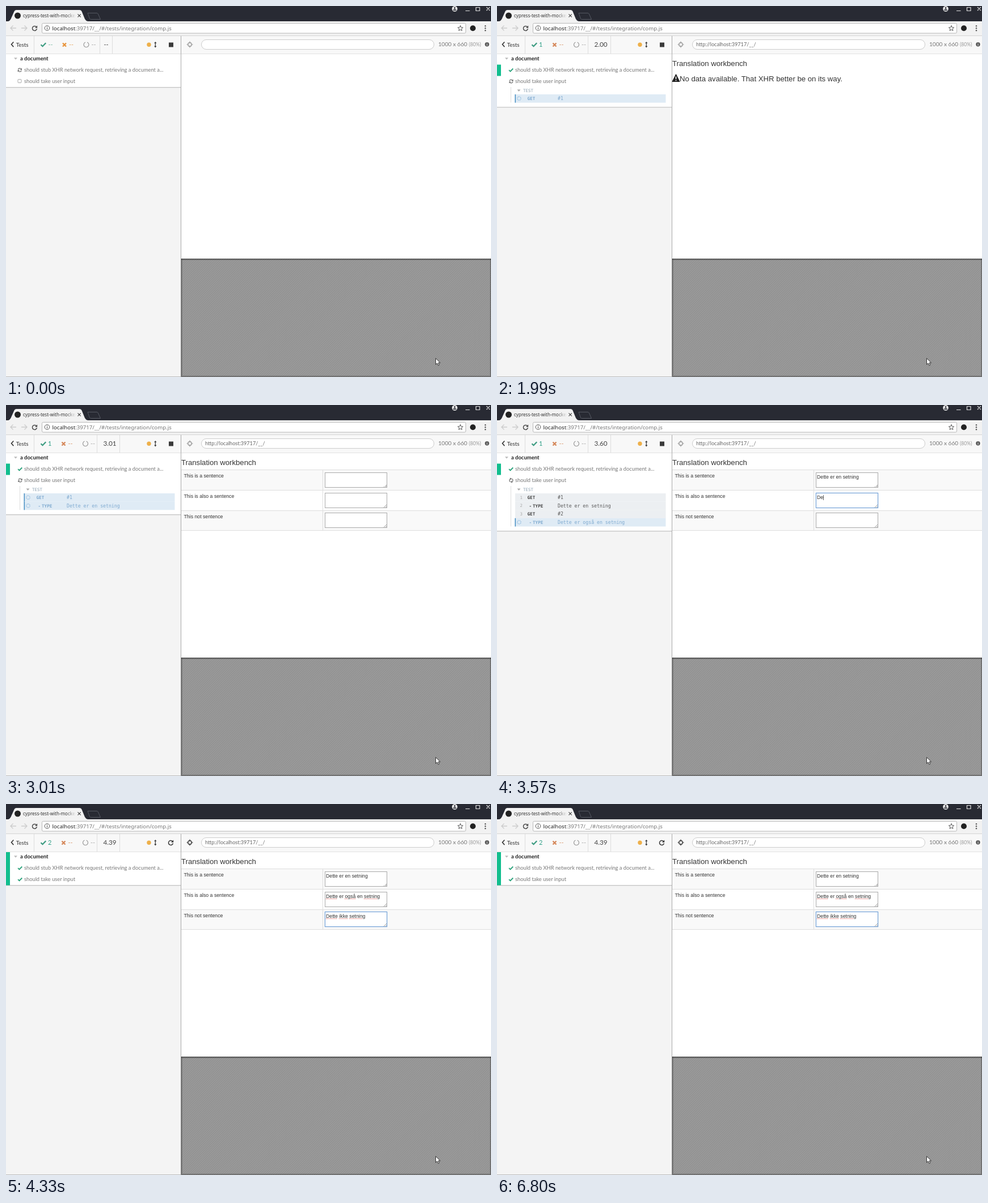
An HTML page that plays this animation: 855x655 px, repeating every 7.51 s.

```html
<!DOCTYPE html>
<html lang="en">
<head>
<meta charset="utf-8">
<title>Test runner</title>
<style>
html, body { margin: 0; width: 100%; height: 100%; overflow: hidden; background: #f4f4f4; }
#stage { position: absolute; left: 0; top: 0; width: 855px; height: 655px; overflow: hidden; }
svg { position: absolute; left: 0; top: 0; display: block; }
text { white-space: pre; }
.ui { font-family: Lato, sans-serif; }
.chrome { font-family: "Noto Sans", "Open Sans", sans-serif; }
.app { font-family: "Liberation Sans", Arial, sans-serif; fill: #333; }
.mono { font-family: "DejaVu Sans Mono", monospace; }
.line { fill: none; stroke-linecap: butt; }
.title { font-size: 9.3px; fill: #777; }
.cmd .bg { fill: #eceff2; }
.cmd .edge, .cmd .busy { display: none; }
.cmd .name { font-weight: bold; font-size: 7.6px; fill: #444; }
.cmd .arg { font-size: 8.2px; fill: #5a5a5a; }
.cmd .num { font-size: 7.4px; fill: #aaa; }
.wait .bg { fill: #dfebf5; }
.wait .edge, .wait .busy { display: inline; }
.wait .num { display: none; }
.wait .name, .wait .arg { fill: #7faad0; }
.field {
  position: absolute; left: 562px; width: 106px; height: 22px; padding: 2px 1px 1px;
  border: 1px solid #a9a9a9; background: #fff; color: #333; white-space: pre;
  font: 8.74px/10px "Liberation Sans", Arial, sans-serif;
}
.field::after {
  content: ""; position: absolute; right: 0; bottom: 0; width: 5px; height: 5px;
  background: linear-gradient(135deg, transparent 50%, #999 50% 60%, transparent 60% 76%, #999 76% 88%, transparent 88%);
}
.field.focus { border-color: #6f9fd6; box-shadow: 0 0 1px #6f9fd6; }
.field.caret span::after { content: ""; display: inline-block; width: 1px; height: 9px; margin-right: -1px; background: #666; vertical-align: -2px; }
.field u { text-decoration: underline dotted #e0524d 1px; text-underline-offset: 1px; }
</style>
</head>
<body>
<div id="stage">
<svg width="855" height="655" viewBox="0 0 855 655">
  <defs>
    <pattern id="stripes" width="2.83" height="2.83" patternUnits="userSpaceOnUse" patternTransform="rotate(45)">
      <rect width="2.83" height="2.83" fill="#9d9d9d"/><rect width="1.4" height="2.83" fill="#8f8f8f"/>
    </pattern>
    <linearGradient id="shade" x2="0" y2="1"><stop stop-color="#000" stop-opacity=".55"/><stop offset="1" stop-color="#000" stop-opacity="0"/></linearGradient>
    <linearGradient id="fade" gradientUnits="userSpaceOnUse" x1="106" x2="123" y1="0" y2="0"><stop stop-color="#333"/><stop offset="1" stop-color="#333" stop-opacity="0"/></linearGradient>
    <path id="tick" class="line" d="M-3.6 .1L-1.2 2.4L3.6 -2.5" stroke="#2ba37b" stroke-width="1.8"/>
    <g id="half"><path class="line" d="M-3 -.5A3 3 0 0 1 2.1 -2.1" stroke="#666" stroke-width="1.2"/><path d="M3.5 -3.7V-.4H.3Z" fill="#666"/></g>
    <g id="sync"><use href="#half"/><use href="#half" transform="rotate(180)"/></g>
    <g id="reload"><path class="line" d="M3 -2.4A4 4 0 1 0 3.9 1" stroke="currentColor" stroke-width="1.5"/><path d="M4.7 -4.7V-.5H.5Z" fill="currentColor"/></g>
    <path id="cross" class="line" d="M-3 -3L3 3M3 -3L-3 3" stroke-width="2.4"/>
    <path id="notch" class="line" d="M1.5 -4.3A4.5 4.5 0 1 1 -1.5 -4.3" stroke="#999" stroke-width="1.2"/>
    <path id="down" d="M-3 -1.8H3L0 1.8Z"/>
    <circle id="ring" class="line" r="3.2" stroke="#79acd6" stroke-width="1.1" stroke-dasharray="1.3 1.2" pathLength="20"/>
  </defs>

  <!-- browser frame -->
  <rect width="855" height="27" fill="#282a33"/>
  <path d="M4 27Q7 26 8.500 23L14.500 9.500Q15.500 7 18 7H130Q132.500 7 133.500 9.500L139 23Q140.500 26 144 27Z" fill="#f2f2f2"/>
  <path class="line" d="M144 12.500H160Q161.500 12.500 162.300 14L166.500 23.500H149.500Q148 23.500 147.300 22Z" stroke="#555862"/>
  <circle cx="20.500" cy="17" r="5.500" fill="#222"/>
  <text class="chrome" x="30" y="20" font-size="8.05" fill="url(#fade)">cypress-test-with-mocked</text>
  <path class="line" d="M126.500 14.300L131.800 19.600M131.800 14.300L126.500 19.600" stroke="#444" stroke-width="1.2"/>
  <circle cx="791" cy="5" r="4.800" fill="#eee"/>
  <circle cx="791" cy="3.500" r="1.500" fill="#282a33"/><path d="M788 8Q788 5.700 791 5.700T794 8Z" fill="#282a33"/>
  <path class="line" d="M810 8.500H817.500M828.500 2.500H835V8.500H828.500ZM847 2L853 8M853 2L847 8" stroke="#e0e0e0" stroke-width="1.2"/>
  <rect y="27" width="855" height="25.500" fill="#f2f2f2"/>
  <path class="line" d="M18 39H8M12.500 34.500L8 39L12.500 43.500M27 39H37M32.500 34.500L37 39L32.500 43.500" stroke="#ccc" stroke-width="1.3"/>
  <use href="#reload" x="50.500" y="39.200" color="#4a4a4a"/>
  <rect x="63.500" y="30.500" width="747" height="17.500" rx="2" fill="#fff" stroke="#b8b8b8"/>
  <circle class="line" cx="72.500" cy="39" r="4.300" stroke="#555"/>
  <path class="line" d="M72.500 38.300V41.500M72.500 36.300V37.500" stroke="#555" stroke-width="1.1"/>
  <text class="chrome" x="81.500" y="42.700" font-size="9.65" fill="#777"><tspan fill="#222">localhost</tspan>:39717/__/#/tests/integration/comp.js</text>
  <path class="line" d="M801 34.500L802.300 37.800L805.600 38L803 40.200L803.900 43.500L801 41.700L798.100 43.500L799 40.200L796.400 38L799.700 37.800Z" stroke="#555"/>
  <circle cx="823" cy="39.300" r="5" fill="#222"/>
  <g fill="#555"><circle cx="845" cy="35.200" r="1.200"/><circle cx="845" cy="39.200" r="1.200"/><circle cx="845" cy="43.200" r="1.200"/></g>

  <!-- runner header -->
  <rect y="52" width="855" height="33" fill="#f8f8f8"/>
  <path class="line" d="M0 52.500H855" stroke="#d4d4d4"/>
  <path class="line" d="M13.300 63.500L9.500 67.800L13.300 72.100" stroke="#333" stroke-width="1.6"/>
  <text class="ui" x="17.700" y="71.500" font-size="9.9" fill="#333">Tests</text>
  <path class="line" d="M49.500 53V84" stroke="#ddd"/>
  <path class="line" d="M61.500 68.200L64.500 71.200L70.200 65.200" stroke="#3d9c81" stroke-width="2.3"/>
  <g class="ui" font-size="11">
    <g data-on="0 750">
      <text x="74.500" y="72" fill="#79b8a3">--</text>
      <use href="#cross" x="103" y="68.500" stroke="#e8943c"/><text x="111" y="72" fill="#e8a55f">--</text>
      <use href="#notch" x="141.500" y="68.300"/><text x="150.500" y="72" fill="#aaa">--</text>
      <path class="line" d="M165.500 53V84" stroke="#ddd"/>
    </g>
    <g data-on="750 7510">
      <text id="passed" x="74" y="72" fill="#2f9f87">1</text>
      <use href="#cross" x="101.500" y="68.500" stroke="#d6895c"/><text x="109.500" y="72" fill="#d9986f">--</text>
      <use href="#notch" x="140" y="68.300"/><text x="149" y="72" fill="#aaa">--</text>
      <path class="line" d="M160.500 53V84" stroke="#ddd"/>
    </g>
    <text id="clock" y="72" fill="#444">--</text>
    <path id="clockEdge" class="line" d="M0 53V84" stroke="#ddd"/>
  </g>
  <circle cx="252" cy="68.300" r="3.700" fill="#eeb04a"/>
  <path d="M263.300 63L265.500 65.800H263.900V70.700H265.500L263.300 73.500L261.100 70.700H262.700V65.800H261.100Z" fill="#333"/>
  <rect data-on="0 4330" x="287" y="64.500" width="8" height="8" fill="#3a3a3a"/>
  <use data-on="4330 7510" href="#reload" x="290.500" y="68.300" color="#333"/>
  <g id="aim" class="line" stroke="#999" stroke-width="1.200" transform="translate(324 68)"><circle r="3.300"/><path d="M0 -5.500V-1.800M0 5.500V1.800M-5.500 0H-1.800M5.500 0H1.800"/></g>
  <rect x="344.500" y="59.500" width="410" height="17" rx="8.500" fill="#fff" stroke="#ccc"/>
  <text class="ui" data-on="300 7510" x="351" y="71" font-size="9.1" fill="#666">http://localhost:39717/__/</text>
  <text class="ui" x="762" y="71.300" font-size="10.1" fill="#777">1000 x 660</text>
  <text class="ui" x="816" y="71.300" font-size="8.6" fill="#999">(80%)</text>
  <circle cx="848" cy="67.800" r="3.700" fill="#555"/><path class="line" d="M848 67.200V70M848 65.200V66.300" stroke="#f8f8f8" stroke-width="1.100"/>

  <!-- test list -->
  <rect y="84" width="308" height="571" fill="#f4f4f4"/>
  <g id="edge"><path class="line" d="M0 .5H308" stroke="#c6c6c6"/><path class="line" d="M0 1.500H308" stroke="#e4e4e4"/></g>
  <rect id="panel" y="84" width="308" fill="#fff"/>
  <rect data-on="750 4330" y="103.500" width="7" height="20" fill="#12be8e"/>
  <rect data-on="4330 7510" y="84" width="7" height="59.500" fill="#12be8e"/>
  <use href="#down" x="17" y="93" fill="#bbb"/>
  <text class="ui" x="25" y="96" font-size="9.450" font-weight="bold" fill="#222">a document</text>
  <use class="spin" data-on="0 750" data-pos="24.300 113" href="#sync"/>
  <use data-on="750 7510" href="#tick" x="24.700" y="113"/>
  <text class="ui title" x="32" y="116">should stub XHR network request, retrieving a document a...</text>
  <rect class="line" data-on="0 750" x="21" y="129.500" width="6" height="6" rx="1" stroke="#aaa"/>
  <use class="spin" data-on="750 4330" data-pos="25 133" href="#sync"/>
  <use data-on="4330 7510" href="#tick" x="24.700" y="133"/>
  <text class="ui title" x="32" y="136">should take user input</text>
  <g data-on="1050 4330">
    <path id="rail" class="line" stroke="#ddd"/>
    <use href="#down" x="38.500" y="149.300" fill="#aaa"/>
    <text class="mono" x="46" y="152.200" font-size="7.5" fill="#8fa3b3">TEST</text>
    <g id="log"></g>
  </g>

  <!-- page under test -->
  <rect x="309" y="84" width="546" height="363" fill="#fff"/>
  <path class="line" d="M0 84.500H855" stroke="#e2e2e2"/>
  <path class="line" d="M308.500 53V655" stroke="#aaa"/>
  <path class="line" d="M0 654.500H309" stroke="#bbb"/>
  <rect x="309" y="446" width="546" height="209" fill="url(#stripes)"/>
  <rect x="309" y="446" width="546" height="3.500" fill="url(#shade)"/>
  <g class="line" stroke="#333" stroke-opacity=".25">
    <path d="M309.500 446V654.500H854.500V446"/>
    <path d="M309.500 446V654H854.500V446" stroke-width="3"/>
  </g>
  <g class="app" font-size="13.16">
    <text data-on="450 7510" x="309" y="106.300">Translation workbench</text>
    <g data-on="450 2950">
      <path d="M315.500 120.500L322 133.500H309Z" fill="#222" stroke="#222" stroke-linejoin="round"/>
      <path class="line" d="M315.500 124.500V129M315.500 130.500V132.300" stroke="#fff" stroke-width="1.600"/>
      <text x="322" y="133.100">No data available. That XHR better be on its way.</text>
    </g>
  </g>
  <g class="app" data-on="2950 7510" font-size="8.74">
    <path d="M309 114.500H855V150.500H309ZM309 186.500H855V222H309Z" fill="#f9f9f9"/>
    <path class="line" d="M309 114.500H855M309 150.500H855M309 186.500H855M309 221.500H855M558.500 114V222" stroke="#ddd"/>
    <text x="313.500" y="128.300">This is a sentence</text>
    <text x="313.500" y="164">This is also a sentence</text>
    <text x="313.500" y="199.700">This not sentence</text>
  </g>
  <path id="mouse" d="M0 0V11L2.600 8.600L4.400 12.600L6.200 11.800L4.500 7.900H8Z" fill="#fff" stroke="#222" stroke-width=".9"/>
</svg>
<div id="fields" data-on="2950 7510"></div>
</div>
<script>
const LOOP = 7510, END = 4330, KEY_MS = 16, FRAME = 47;
const $ = id => document.getElementById(id);
const commands = [
  { at: 1050, name: 'GET', arg: '#1', done: 3040 },
  { at: 2960, name: 'TYPE', arg: 'Dette er en setning', done: 3430 },
  { at: 3430, name: 'GET', arg: '#2', done: 3480 },
  { at: 3480, name: 'TYPE', arg: 'Dette er også en setning', done: 3935 },
  { at: 3935, name: 'GET', arg: '#3', done: 3980 },
  { at: 3980, name: 'TYPE', arg: 'Dette ikke setning', done: END }
];
const fields = [
  { top: 119, start: 3090, blur: 3430, text: commands[1].arg, marks: 0 },
  { top: 154.6, start: 3550, blur: 3935, text: commands[3].arg, marks: 3935 },
  { top: 190.4, start: 4020, blur: LOOP, text: commands[5].arg, marks: END }
];
// [ms, seconds on the clock]
const clockKeys = [[95, .09], [970, 1], [1990, 2], [3010, 3.01], [3570, 3.6], [END, 4.39]];
const mouseKeys = [[0, 757.5, 622], [6670, 773, 642], [6713, 770, 636], [6757, 763, 628], [6800, 757.5, 622]];

$('log').innerHTML = commands.map((c, i) => {
  const y = 156 + i * 14.6, typed = c.name === 'TYPE';
  return `<g class="cmd mono" transform="translate(0 ${y})">
    <rect class="bg" x="32" width="265.500" height="14.700"/>
    <rect class="edge" x="31.500" width="1.600" height="14.700" fill="#4a90c4"/>
    <use class="busy spin" data-pos="39 7.200" href="#ring"/>
    <text class="num" x="40.500" y="9.800">${i + 1}</text>
    ${typed ? '<text class="name" x="56.500" y="10">-</text>' : ''}
    <text class="name" x="${typed ? 63 : 53.5}" y="10">${c.name}</text>
    <text class="arg" x="107" y="10">${c.arg}</text></g>`;
}).join('');
$('fields').innerHTML = fields.map(f => `<div class="field" style="top:${f.top}px"><span></span></div>`).join('');

const timed = [...document.querySelectorAll('[data-on]')].map(el => [el, ...el.dataset.on.split(' ').map(Number)]);
const spinners = [...document.querySelectorAll('.spin')];
const rows = [...document.querySelectorAll('.cmd')];
const boxes = [...document.querySelectorAll('.field')];
const lastKey = (keys, t) => keys.findLastIndex(k => k[0] <= t);

function clockText(t) {
  const i = lastKey(clockKeys, t);
  if (i < 0) return '--';
  const [t0, v0] = clockKeys[i], next = clockKeys[i + 1];
  if (!next) return v0.toFixed(2);
  const step = Math.floor((t - t0) / FRAME) * FRAME;
  return (v0 + (next[1] - v0) * step / (next[0] - t0)).toFixed(2);
}

function drawClock(t) {
  const value = clockText(t), running = value !== '--', shift = t < 750 ? 5 : 0;
  $('clock').textContent = value;
  $('clock').setAttribute('x', running ? 171.5 + shift : 172.5);
  $('clock').setAttribute('font-size', running ? 11.7 : 11);
  $('clockEdge').setAttribute('transform', `translate(${running ? 200.5 + shift : 187.5} 0)`);
}

function drawLog(t) {
  const count = t < END ? commands.filter(c => t >= c.at).length : 0;
  const bottom = count ? 163.5 + 14.6 * count : 143;
  $('panel').setAttribute('height', bottom - 84);
  $('edge').setAttribute('transform', `translate(0 ${Math.round(bottom)})`);
  $('rail').setAttribute('d', `M24.500 143V${156 + 14.6 * count}`);
  rows.forEach((row, i) => {
    row.style.display = i < count ? '' : 'none';
    row.classList.toggle('wait', t < commands[i].done);
  });
}

function drawField(box, f, t) {
  const n = t < f.start ? 0 : Math.min(f.text.length, Math.floor((t - f.start) / KEY_MS) + 1);
  const focus = t >= f.start - 30 && t < f.blur;
  const marked = f.marks && t >= f.marks;
  const html = marked ? f.text.replace(/\S{4,}/g, '<u>$&</u>') : f.text.slice(0, n);
  box.classList.toggle('focus', focus);
  box.classList.toggle('caret', focus && t < END);
  if (box.shown !== html) box.firstChild.innerHTML = box.shown = html;
}

function draw(t) {
  for (const [el, from, to] of timed) el.style.display = t >= from && t < to ? '' : 'none';
  const angle = (t - 970) / 2000 * 360;
  for (const el of spinners) el.setAttribute('transform', `translate(${el.dataset.pos}) rotate(${angle})`);
  $('passed').textContent = t < END ? '1' : '2';
  $('aim').setAttribute('stroke', t < END ? '#999' : '#333');
  drawClock(t);
  drawLog(t);
  boxes.forEach((box, i) => drawField(box, fields[i], t));
  const [, x, y] = mouseKeys[lastKey(mouseKeys, t)];
  $('mouse').setAttribute('transform', `translate(${x} ${y})`);
}

const begin = performance.now();
function tick() {
  draw((performance.now() - begin) % LOOP);
  requestAnimationFrame(tick);
}
tick();
</script>
</body>
</html>
```
